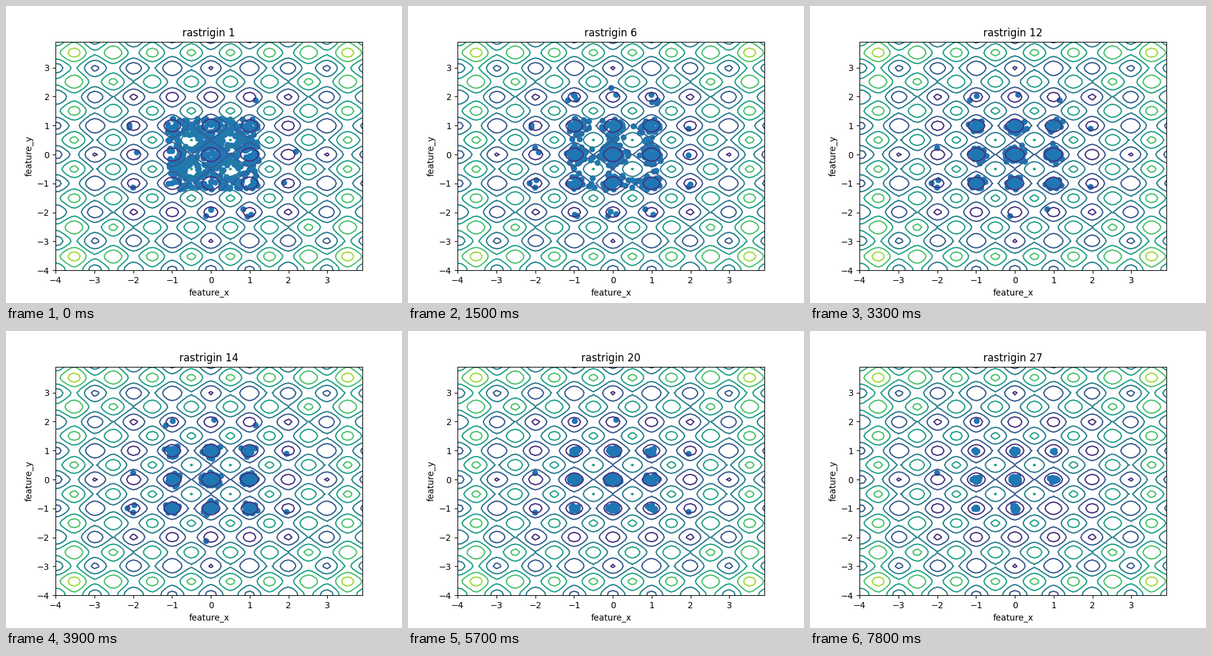
Write a matplotlib script that moves like this. It is 640 px wide and 480 px high and loops after 8 s.

```python
import numpy as np
import matplotlib.pyplot as plt
from matplotlib.animation import FuncAnimation

STEP_MS, TICK_MS, LOOP_MS = 300, 100, 8000
GENERATIONS = 27
POPULATION = 480
STRAYS = 42


def rastrigin(x, y):
    return (20 + x**2 - 10 * np.cos(2 * np.pi * x)
            + y**2 - 10 * np.cos(2 * np.pi * y))


def candidates(rng, count=60000):
    """Positions crowded towards the centre, sorted by cost."""
    pool = rng.normal(0, 0.8, (count, 2))
    pool = pool[np.abs(pool).max(axis=1) < 1.28]
    cost = rastrigin(*pool.T)
    order = np.argsort(cost)
    return pool[order], cost[order]


def starting_square(rng):
    """An even spread that leaves the highest peaks empty."""
    points = rng.uniform((-1.12, -1.2), (1.23, 1.25), (3 * POPULATION, 2))
    return points[rastrigin(*points.T) < 36][:POPULATION]


def outer_wells(rng):
    """Individuals around the ring of wells two units out, with birth and death."""
    along = rng.integers(-1, 2, STRAYS)
    across = rng.choice((-2, 2), STRAYS)
    swap = rng.random(STRAYS) < 0.5
    wells = np.where(swap, (along, across), (across, along)).T
    birth = rng.integers(1, 6, STRAYS)
    death = birth + rng.exponential(9, STRAYS)
    return wells + rng.normal(0, 0.1, (STRAYS, 2)), birth, death


def evolve():
    """Positions per generation; an individual moves when its cost passes its limit."""
    rng = np.random.default_rng(7)
    pool, pool_cost = candidates(rng)
    positions = starting_square(rng)
    strays, birth, death = outer_wells(rng)
    tolerance = rng.gamma(4, 0.25, POPULATION)

    history = []
    for generation in range(1, GENERATIONS + 1):
        if generation > 1:
            limit = 26 * np.exp(-0.105 * (generation - 1)) * tolerance
            allowed = np.maximum(np.searchsorted(pool_cost, limit), 1)
            fresh = pool[(rng.random(POPULATION) * allowed).astype(int)]
            moves = rastrigin(*positions.T) > limit
            positions = np.where(moves[:, None], fresh, positions)
        alive = (birth <= generation) & (generation <= death)
        history.append(np.vstack([positions, strays[alive]]))
    return history


history = evolve()

fig, ax = plt.subplots(figsize=(6.4, 4.8), dpi=100)
axis = np.arange(-40, 40) / 10
grid_x, grid_y = np.meshgrid(axis, axis)
ax.contour(grid_x, grid_y, rastrigin(grid_x, grid_y))
points = ax.scatter(*history[0].T, color="#1f77b4")
ax.set(xlim=(axis[0], axis[-1]), ylim=(axis[0], axis[-1]),
       xlabel="feature_x", ylabel="feature_y")
title = ax.set_title("rastrigin 1")


def update(frame):
    index = min(frame * TICK_MS // STEP_MS, GENERATIONS - 1)
    points.set_offsets(history[index])
    title.set_text(f"rastrigin {index + 1}")
    return points, title


animation = FuncAnimation(fig, update, frames=LOOP_MS // TICK_MS,
                          interval=TICK_MS, repeat=True, repeat_delay=0)
plt.show()
```
